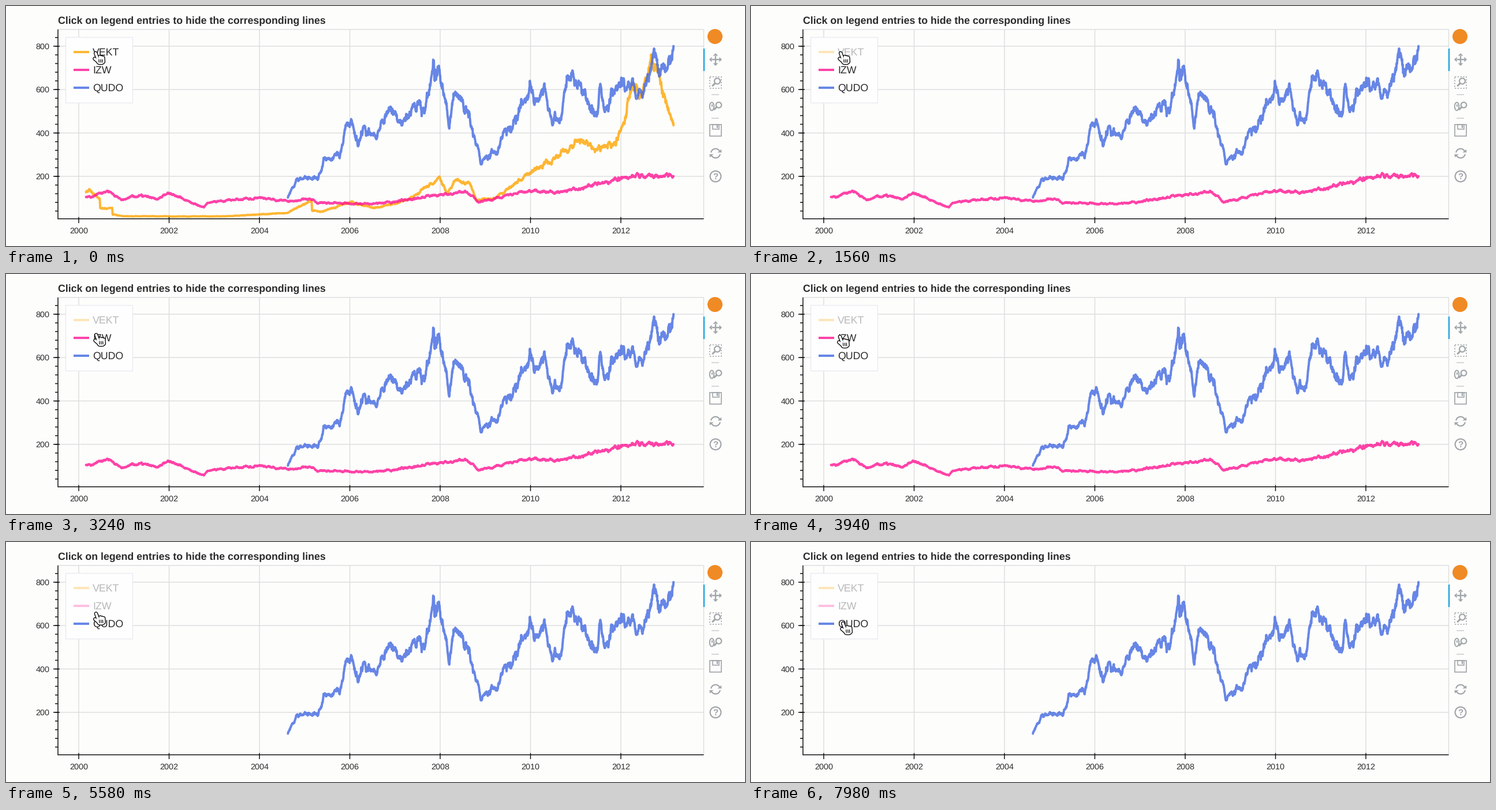
Animation of 1280 by 417 pixels, one loop 8 s. Source, as a matplotlib script:

```python
import numpy as np
import matplotlib.pyplot as plt
from matplotlib.animation import FuncAnimation
from matplotlib.collections import LineCollection
from matplotlib.patches import Circle, Polygon, Rectangle

W, H, DPI = 1280, 417, 100
LOOP, TICK = 8000, 20
PT = 72 / DPI
BG, INK, GRID, ICON = "#fdfdfc", "#2b2b2b", "#dddddd", "#a1a6a9"

plt.rcParams.update({"font.family": "Liberation Sans", "text.hinting": "none"})
fig = plt.figure(figsize=(W / DPI, H / DPI), dpi=DPI, facecolor=BG)
ax = fig.add_axes([0, 0, 1, 1])
ax.set(xlim=(0, W), ylim=(H, 0))
ax.axis("off")

# Main turning points: (years since 2000, price)
VEKT = [
    (.16, 127), (.24, 138), (.469, 98), (.471, 54), (.74, 55), (.75, 24),
    (1, 16), (3.2, 16), (4.6, 31), (5.159, 87), (5.161, 42), (5.4, 37),
    (6.03, 83), (6.54, 54), (7.3, 95), (7.99, 197), (8.15, 124), (8.35, 183),
    (8.65, 170), (8.8, 92), (9.2, 97), (10, 212), (11.1, 355), (11.46, 325),
    (11.95, 395), (12.27, 630), (12.4, 565), (12.72, 700), (13.17, 432),
]
IZW = [
    (.16, 105), (.67, 128), (.95, 92), (1.4, 113), (1.72, 94), (2, 122),
    (2.77, 57), (2.85, 78), (4.1, 97), (4.7, 85), (5.1, 97), (5.3, 76),
    (6.55, 76), (8.6, 127), (8.85, 79), (10, 130), (10.65, 126),
    (12.25, 205), (13.17, 201),
]
QUDO = [
    (4.63, 102), (4.82, 188), (5.3, 188), (5.43, 285), (5.79, 303),
    (5.88, 405), (6.03, 464), (6.19, 345), (6.3, 430), (6.59, 374),
    (6.85, 495), (7.17, 446), (7.53, 548), (7.67, 512), (7.85, 736),
    (7.88, 640), (7.97, 710), (8.2, 420), (8.34, 588), (8.6, 500),
    (8.89, 266), (9.18, 312), (10, 622), (10.08, 532), (10.28, 585),
    (10.5, 448), (10.66, 465), (10.79, 610), (11.1, 618), (11.47, 482),
    (11.56, 612), (11.63, 505), (12.01, 655), (12.48, 562), (12.76, 762),
    (12.85, 660), (13.17, 802),
]


def to_px(t, v):
    return 126 + 78.25 * t, 371.4 - 0.377 * v


def series(points, vol, seed):
    """Join turning points with seeded daily noise that vanishes at each one."""
    keys, prices = np.array(points).T
    t = np.arange(keys[0], keys[-1], 1 / 200)
    shocks = np.random.default_rng(seed).normal(0, vol, t.size)
    noise = np.zeros(t.size)
    for k in range(1, t.size):
        noise[k] = 0.88 * noise[k - 1] + shocks[k]
    noise -= np.interp(t, keys, np.interp(keys, t, noise))
    return to_px(t, np.interp(t, keys, prices) * (1 + noise))


def line(x, y, color, width, **kw):
    kw = {"solid_capstyle": "butt", "solid_joinstyle": "round", **kw}
    return ax.plot(x, y, color=color, lw=width * PT, **kw)[0]


def segments(segs, color, width, z, **kw):
    return ax.add_collection(LineCollection(
        segs, colors=color, linewidths=np.multiply(width, PT), zorder=z,
        snap=False, **kw))


def text(x, y, s, size, color=INK, **kw):
    return ax.text(x, y, s, fontsize=size * PT, color=color, **kw)


def shape(points):
    ax.add_patch(Polygon(points, fc=ICON, lw=0))


def ring(x, y, r):
    ax.add_patch(Circle((x, y), r, fill=False, ec=ICON, lw=2.2 * PT))


def magnifier(x, y, r):
    ring(x, y, r)
    line([x - r * .7, x - r * 1.75], [y + r * .7, y + r * 1.75], ICON, 3)


def draw_axes():
    left, right, top, bottom = 90, 1208.5, 40.7, 369.7
    xs = {2000 + y: to_px(y, 0)[0] for y in range(0, 14, 2)}
    ys = {v: to_px(0, v)[1] for v in range(200, 801, 200)}
    minor = [to_px(0, v)[1] for v in range(40, 841, 40)]
    segments([[(x, top), (x, bottom)] for x in [*xs.values(), right]]
             + [[(left, y), (right, y)] for y in [*ys.values(), top]], GRID, 1.4, 0)
    segments([[(left, top), (left, bottom + .7)], [(left, bottom), (right, bottom)]]
             + [[(x, bottom - 3), (x, bottom + 7.5)] for x in xs.values()]
             + [[(left - 8, y), (left + 3, y)] for y in ys.values()]
             + [[(left - 5, y), (left, y)] for y in minor], "#111111", 1.5, 3)
    for year, x in xs.items():
        text(x, 395, year, 14.4, ha="center")
    for v, y in ys.items():
        text(75.3, y + 5, v, 14.4, ha="right")
    text(90, 30, "Click on legend entries to hide the corresponding lines",
         17.75, weight="bold")


def draw_toolbar():
    ax.add_patch(Circle((1228, 53), 13, fc="#f08a24", lw=0))
    segments([[(1209, 74), (1209, 113)]], "#26aae1", 2.6, 4)
    segments([[(1222, y), (1235, y)] for y in (154, 195)], "#c4c7c9", 1.4, 3)

    # pan
    cx, cy = 1229, 93
    for dx, dy in ((1, 0), (-1, 0), (0, 1), (0, -1)):
        bx, by = cx + 6.5 * dx, cy + 6.5 * dy
        line([cx, bx], [cy, by], ICON, 2.4)
        shape([(cx + 11 * dx, cy + 11 * dy), (bx + 4.5 * dy, by + 4.5 * dx),
               (bx - 4.5 * dy, by - 4.5 * dx)])
    # box zoom
    ax.add_patch(Rectangle((1219, 123), 20, 20, fill=False, ec=ICON, lw=1.5 * PT,
                           ls=(0, (1.6, 1.6))))
    magnifier(1232, 130.5, 5)
    # wheel zoom
    a = np.linspace(0, 2 * np.pi, 40)
    line(1222.5 + 3.7 * np.cos(a), 174.5 + 7 * np.sin(a), ICON, 2)
    line([1222.5, 1222.5], [171, 175], ICON, 2)
    magnifier(1234.5, 172, 4.8)
    # save
    ax.add_patch(Rectangle((1219, 206), 20, 20, fill=False, ec=ICON, lw=1.7 * PT))
    ax.add_patch(Rectangle((1224, 206), 11, 8, fill=False, ec=ICON, lw=1.6 * PT))
    line([1232, 1232], [207, 212], ICON, 2.4)
    # reset
    a = np.radians(np.linspace(190, 335, 30))
    for s in (1, -1):
        line(1229 + s * 8 * np.cos(a), 256 + s * 8 * np.sin(a), ICON, 2.2)
        shape([(1229 + s * dx, 256 + s * dy)
               for dx, dy in ((3.5, -1.5), (10.5, -1.5), (10, -7))])
    # help
    ring(1229, 296, 9.4)
    text(1229, 301.3, "?", 15, ICON, weight="bold", ha="center")


class Entry:
    """A plotted line with its legend row."""

    def __init__(self, name, color, points, vol, seed, row, hide_at):
        self.hide_at = hide_at
        self.curve = line(*series(points, vol, seed), color, 4, alpha=.8,
                          solid_capstyle="round", zorder=2)
        y = 80.3 + 30.6 * row
        self.swatch = line([117, 143.5], [y, y], color, 4, zorder=6)
        self.label = text(150, y + 5.8, name, 17.7, zorder=6)

    def update(self, now):
        on = now < self.hide_at
        self.curve.set_visible(on)
        self.swatch.set_alpha(.8 if on else .27)
        self.label.set_alpha(1 if on else .33)


class Hand:
    """Pointing hand made of round strokes: index, knuckles, thumb and palm."""

    def __init__(self):
        knuckles = [[(x, 6.5 + x / 4), (x + .5, 17)] for x in (6.5, 9.5, 12.3)]
        strokes = [[(-.8, 1.8), (4.5, 16)], *knuckles,
                   [(-2.5, 11.5), (4, 17)], [(5.5, 17.2), (10, 17.2)]]
        creases = [[(x, 13), (x + .4, 18)] for x in (4.8, 7.8, 10.6)]
        width = np.array([4, 4, 4, 4, 4, 7.5])
        self.layers = [
            (np.array(segs), segments(segs, color, w, z, capstyle="round"))
            for segs, color, w, z in ((strokes, "black", width + 2.6, 8),
                                      (strokes, "white", width, 9),
                                      (creases, "black", 1.2, 10))]

    def move(self, tip):
        for segs, artist in self.layers:
            artist.set_segments(segs + tip)


START = np.array([156, 80])
MOVES = [(1700, 2700, (157, 104)), (3300, 4300, (154, 108)), (5240, 5900, (160, 139.5))]


def fingertip(now):
    tip = START
    for begin, end, goal in MOVES:
        u = np.clip((now - begin) / (end - begin), 0, 1)
        tip = tip + (np.array(goal) - tip) * u * u * (3 - 2 * u)
    return tip


def clock(ms):
    """Three evenly spaced poses per 140 ms, held for 20, 100 and 20 ms."""
    k, r = divmod(ms, 140)
    return (3 * k + (r >= 20) + (r >= 120)) * 140 / 3


draw_axes()
draw_toolbar()
ax.add_patch(Rectangle((103, 53.7), 115.5, 114.5, fc="white", ec="#e8e8f1",
                       lw=1.3 * PT, alpha=.95, zorder=5))
entries = [
    Entry("VEKT", "orange", VEKT, .014, 4, 0, 420),
    Entry("IZW", "deeppink", IZW, .013, 7, 1, 5220),
    Entry("QUDO", "royalblue", QUDO, .016, 11, 2, LOOP + 1),
]
hand = Hand()


def draw(i):
    now = clock(i * TICK)
    for entry in entries:
        entry.update(now)
    hand.move(fingertip(now))
    return []


anim = FuncAnimation(fig, draw, frames=LOOP // TICK, interval=TICK,
                     repeat=True, repeat_delay=0)
plt.show()
```
